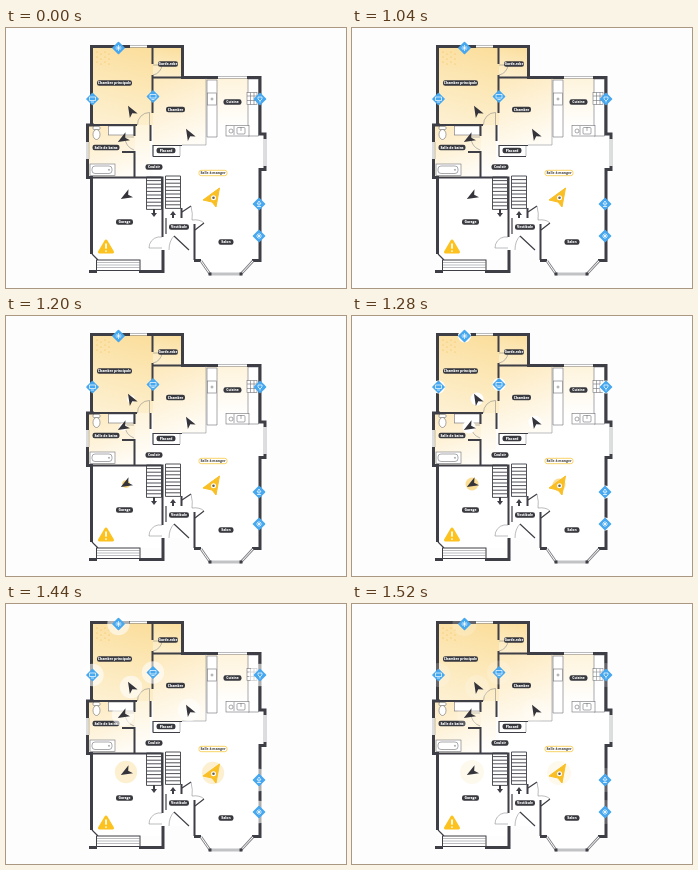
Animation of 340x260 px, one loop 1.6 s. Source, as an HTML page:

```html
<!DOCTYPE html>
<html lang="fr">
<head>
<meta charset="utf-8">
<style>
html, body { margin: 0; width: 100%; height: 100%; overflow: hidden; background: #fdfdfd; }
svg { display: block; width: 340px; height: 260px; }
text { font: 800 3.3px "Open Sans", sans-serif; text-anchor: middle; fill: #fff; }
.wall { fill: none; stroke: #3e3f46; stroke-width: 3; }
.inner { fill: none; stroke: #3e3f46; stroke-width: 2; }
.thin { fill: none; stroke: #77787d; stroke-width: .5; }
.fixture { fill: #fff; stroke: #707176; stroke-width: .6; }
.glyph { fill: none; stroke: #fff; stroke-width: .7; }
</style>
</head>
<body>
<svg viewBox="0 0 340 260">
  <defs>
    <linearGradient id="warm" x1=".6" y1="0" x2=".4" y2="1">
      <stop stop-color="#fbdf9f"/><stop offset="1" stop-color="#fdf0d0"/>
    </linearGradient>
    <linearGradient id="soft" x1=".3" y1="0" x2=".6" y2="1">
      <stop stop-color="#fdeac0"/><stop offset="1" stop-color="#fffcf5"/>
    </linearGradient>
    <linearGradient id="pale" x1="0" y1="0" x2="0" y2="1">
      <stop stop-color="#fef4dc"/><stop offset="1" stop-color="#fff"/>
    </linearGradient>
  </defs>

  <!-- rooms -->
  <path fill="#fff" d="M85 150V232H157V244L160 222H189V232L204 246H235L247 232H254V141H259V106H254V50H147V150Z"/>
  <path fill="url(#warm)" d="M85 19H147V97H85Z"/>
  <path fill="url(#warm)" d="M147 19H176V50H147Z"/>
  <path fill="url(#soft)" d="M147 50H200V117H147Z"/>
  <path fill="url(#soft)" d="M82 97H129V149H82Z"/>
  <path fill="url(#pale)" d="M129 97H144V149H129Z"/>
  <path fill="url(#pale)" d="M200 50H253V100H200Z"/>
  <g id="dots" fill="#f4bd55"></g>

  <!-- furniture -->
  <g class="fixture">
    <path d="M201 52H211V109H201Z"/>
    <rect x="201.500" y="65" width="9" height="12"/>
    <circle cx="206" cy="71" r="1"/>
    <path d="M242 51H252.500V108H242Z"/>
    <rect x="220" y="97.500" width="23" height="10.500"/>
    <rect x="231" y="99.500" width="8" height="6.500" rx="1"/>
    <circle cx="225" cy="103" r="2"/>
    <path d="M228 98V107M235 99V103"/>
    <rect x="241" y="64.500" width="10" height="12"/>
    <path d="M241 68H251M241 72.500H251M244.500 64.500V76.500M248 64.500V76.500"/>
    <rect x="102.500" y="98" width="25.500" height="9"/>
    <rect x="87" y="98.500" width="7" height="3" rx="1"/>
    <ellipse cx="90.500" cy="106.500" rx="3.500" ry="5"/>
    <rect x="84" y="136" width="25" height="11.500"/>
    <rect x="86" y="138" width="20" height="7.500" rx="3"/>
    <circle cx="103" cy="141.800" r=".6"/>
  </g>

  <!-- walls -->
  <path class="wall" d="M85.500 97V18.500H124M141 18.500H176.500V49.500H212M241 49.500H254V106H259V111M259 138V141.500H254V232.500H246M195 232.500H188M81.500 114V97H88M81.500 131V149.500H85.500V226M83 243.500H91M133 243.500H157V222"/>
  <path class="inner" d="M82 149.500H156.500V209M188.500 232V196M146.500 19V36M146.500 47V85M147 49.500H177M85 97H131M144.500 97V113M128.500 97V108M128.500 123V149M116 124H129M175.500 180V190"/>
  <path class="inner" style="stroke-width:1.200" d="M147 128.500V117.500H176M147 128.500H174M86 226L92 232M168 208L183 222M176 184L185 178M189 202L198 195M160 190V206"/>
  <path class="thin" d="M124 17.500H141M124 19.500H141M212 48.500H241M212 50.500H241M258 111V138M260 111V138M81 114V131M83 114V131M176 117H200V50M174 118V128"/>
  <path fill="none" stroke="#85868a" stroke-width="2.600" d="M195 233L204 246H235L247 233"/>
  <path fill="none" stroke="#fff" d="M195 233L204 246H235L247 233"/>
  <path fill="#3e3f46" d="M202.500 244.500h3v3h-3zM233.500 244.500h3v3h-3z"/>
  <rect class="fixture" style="stroke:#3e3f46;stroke-width:1" x="90.500" y="232" width="43.500" height="10.500"/>
  <path class="thin" d="M91 234.500H134M91 237H134M91 239.500H134"/>

  <!-- doors -->
  <path class="thin" d="M143.500 97V84.500A12 12 0 0 0 131.500 97M156 209H152A11 11 0 0 0 143 220H156M147 37H156A11 11 0 0 1 147 47M128 109H119A13 13 0 0 0 128 122M185 178Q187 186 186 192Q194 191 198 195M168 208Q163 213 163 222"/>
  <g id="stairs" class="inner" style="stroke-width:.9"></g>
  <path fill="#3e3f46" d="M147 181H149V185H151L148 189L145 185H147ZM166 190H168V187H170L167 183L164 187H166Z"/>

  <g id="labels"></g>
  <g id="halos"></g>

  <!-- warning -->
  <path fill="#fcc21f" stroke="#fcc21f" stroke-width="3" stroke-linejoin="round" d="M100 213L106.500 224H93.500Z"/>
  <path stroke="#fff" stroke-width="1.700" stroke-linecap="round" d="M100 216V220M100 223V223.100"/>

  <g id="markers"></g>
</svg>
<script>
const byId = id => document.getElementById(id);
const add = (id, markup) => byId(id).insertAdjacentHTML("beforeend", markup);

for (let i = 0; i < 12; i++) {
  const x = 91 + (i % 4) * 4, y = 24 + Math.floor(i / 4) * 5 + (i % 2) * 2;
  add("dots", `<circle cx="${x}" cy="${y}" r=".6"/>`);
}

for (const [x, y] of [[140.5, 149], [159.5, 148]]) {
  for (let i = 0; i < 10; i++) add("stairs", `<path d="M${x} ${y + i * 3.600}h15"/>`);
  add("stairs", `<path d="M${x} ${y}v32.500M${x + 15} ${y}v32.500"/>`);
}

function label(text, x, y, width, outlined) {
  const paint = outlined ? 'fill="#fff" stroke="#f8ce55" stroke-width=".9"' : 'fill="#38393f"';
  add("labels", `<rect x="${x - width / 2}" y="${y - 2.700}" width="${width}" height="5.400" rx="2.200" ${paint}/>
    <text x="${x}" y="${y + 1.200}" ${outlined ? 'style="fill:#55534c"' : ""}>${text}</text>`);
}
label("Chambre principale", 108.5, 55, 35);
label("Garde-robe", 162, 36, 20);
label("Chambre", 169.5, 81.5, 19);
label("Cuisine", 226.5, 74, 18);
label("Salle de bains", 100, 119.5, 27);
label("Placard", 160, 122.5, 19);
label("Couloir", 148, 139, 17);
label("Garage", 118.5, 194, 17);
label("Vestibule", 173, 199, 20);
label("Salon", 220, 214, 15);
label("Salle à manger", 207, 145, 28, true);

const halos = [];
function halo(x, y, color) {
  add("halos", `<circle cx="${x}" cy="${y}" fill="${color}"/>`);
  halos.push({ node: byId("halos").lastElementChild, yellow: color !== "#fff" });
}

const glyphs = {
  fan: "M-3 0H3M0 -3V3M-2 -2L2 2M-2 2L2 -2",
  screen: "M-3 -2H3V1.500H-3ZM-1.500 3H1.500",
  plug: "M-2 -2H2V0L0 2L-2 0ZM0 2V3.500",
  lamp: "M0 -3L2 0H-2ZM0 0V2.500M-2 2.500H2"
};
for (const [x, y, kind] of [[112.5, 20, "fan"], [86.5, 71, "screen"], [147, 68.5, "screen"],
  [254, 71, "plug"], [253, 176, "lamp"], [253, 208, "fan"]]) {
  halo(x, y, "#fff");
  add("markers", `<g transform="translate(${x} ${y})">
    <rect x="-4.700" y="-4.700" width="9.400" height="9.400" rx=".8" fill="#47a8ef" transform="rotate(45)"/>
    <path class="glyph" d="${glyphs[kind]}"/></g>`);
}

const yellow = "#f9c74f";
for (const [x, y, angle, color] of [[125, 83, -30, "#fff"], [183, 106, -30, "#fff"],
  [117, 111, -120, "#fff"], [120, 168, -120, yellow]]) {
  halo(x, y, color);
  add("markers", `<path fill="#34343a" transform="translate(${x} ${y}) rotate(${angle})"
    d="M0 -6L4.500 5.500L0 2.500L-4.500 5.500Z"/>`);
}
halo(207, 169, yellow);
add("markers", `<g transform="translate(207 169)">
  <path fill="#f9bf24" stroke="#f9bf24" stroke-linejoin="round" d="M6.500 -9L3 10L-1 5L-10 3Z"/>
  <circle cx=".5" cy=".7" r="2.500" fill="#fff"/><circle cx=".5" cy=".7" r="1.300" fill="#696252"/></g>`);

const LOOP = 1600, START = 1040, STEP = 80, STEPS = 6;

function draw(now) {
  const time = now % LOOP;
  const progress = Math.floor((time - START) / STEP) / STEPS;
  const eased = progress * progress * (3 - 2 * progress);
  const radius = progress < 0 ? 0 : 1 + 11 * eased;
  const fade = Math.min(1, (1.080 - progress) / .42);
  for (const { node, yellow } of halos) {
    node.setAttribute("r", radius);
    node.setAttribute("opacity", yellow ? Math.max(0, 1.100 - progress) : fade);
  }
}

const origin = performance.now();
function tick() {
  draw(performance.now() - origin);
  requestAnimationFrame(tick);
}
tick();
</script>
</body>
</html>
```
